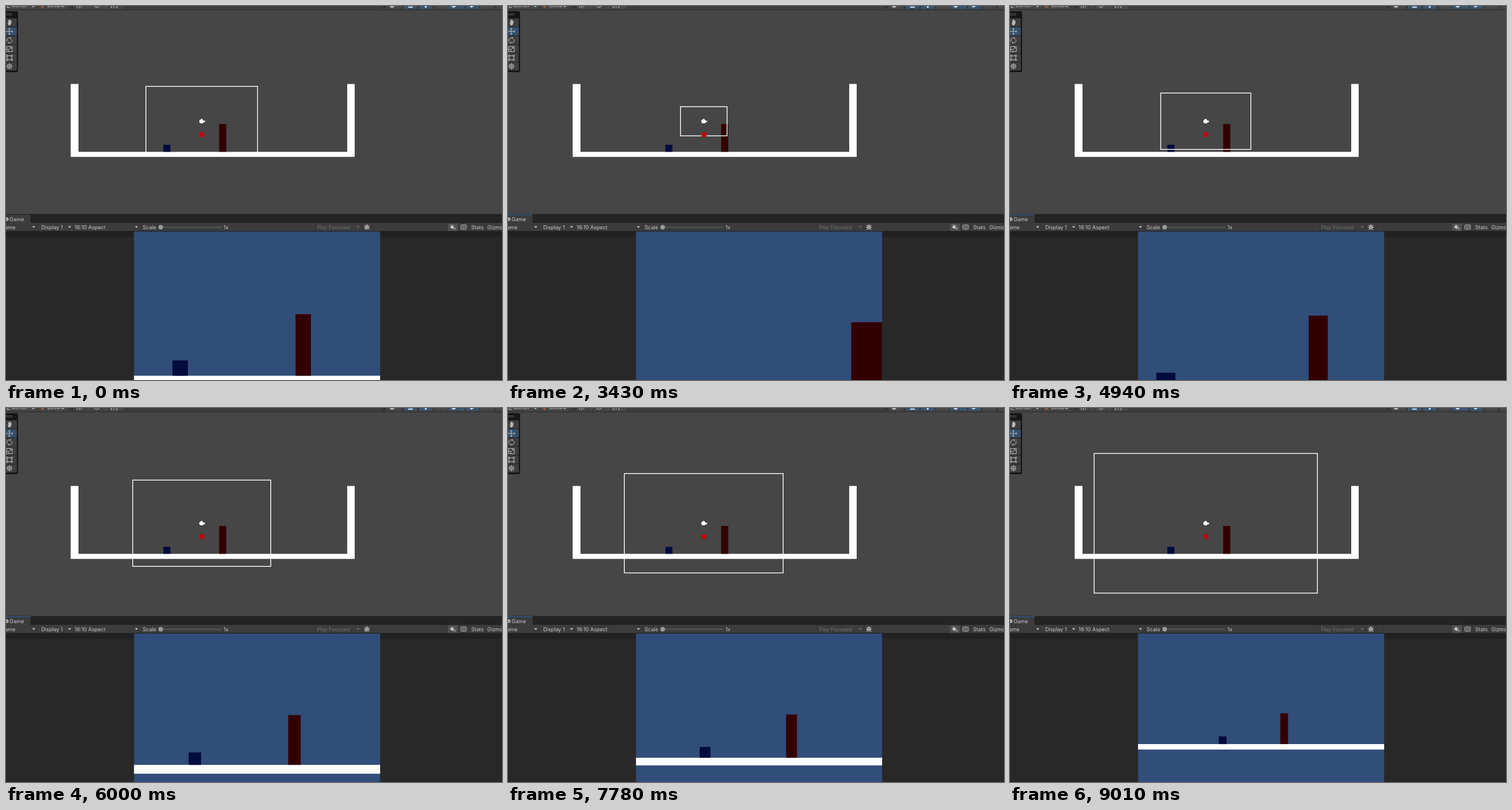
Recreate the animation shown at these times as an HTML page. Size 862 px wide and 650 px high, loop 9760 ms.

```html
<!DOCTYPE html>
<html lang="en">
<head>
<meta charset="utf-8">
<title>Camera zoom</title>
<style>
html, body { margin: 0; width: 100%; height: 100%; overflow: hidden; background: #282828; }
svg { display: block; width: 862px; height: 650px; }
text { font: 9px Inter, "Liberation Sans", sans-serif; fill: #c8c8c8; }
.icon { fill: none; stroke: #bdbdbd; stroke-width: 1; }
</style>
</head>
<body>
<svg viewBox="0 0 862 650">
  <defs>
    <clipPath id="screen"><rect x="222.5" y="392" width="427.7" height="258"/></clipPath>
  </defs>

  <!-- scene view -->
  <rect width="862" height="362" fill="#464646"/>
  <path d="M112.4 135.5H126V253.4H593V135.5H606V262.3H112.4Z" fill="#fff"/>
  <rect x="273.5" y="241.2" width="12.2" height="12.2" fill="#010c3f"/>
  <rect x="370.5" y="205" width="12.3" height="48.4" fill="#330000"/>
  <rect id="frame" fill="none" stroke="#fff" stroke-width="1.4"/>
  <path d="M335.8 200.3q-.4-2 1.8-2.4q.6-2 2.8-1.6q2 .3 2 2.2q1.2.2 1.6 1.2l1.8-.9v3.6l-2-.8q-.2 2-2 2.2q-2.600.5-4.600-.3q-1.300-.4-1-1.900Z" fill="#fff"/>
  <rect x="336.700" y="219.500" width="8" height="8" fill="#c00808"/>

  <!-- scene toolbar, cut by the top edge -->
  <rect width="862" height="7" fill="#3c3c3c"/>
  <rect y="6.500" width="862" height="1" fill="#303030"/>
  <g id="topButtons"></g>
  <text x="9" y="2">Center</text>
  <text x="72" y="2">Local</text>
  <path d="M45 0h5l-2.500 2ZM96 0h5l-2.500 2Z" fill="#c8c8c8"/>
  <circle cx="671" cy="-1" r="4" fill="#b5b5b5"/>
  <path class="icon" d="M2 0v2.500h5M124 0v3M128 0v4M131 0v2M154 0q4 5 8 0M183 0v3h2M188 0v3M193 0v3h-2"/>
  <path d="M60 0h6l-2 4Z" fill="#b05a32"/>
  <path d="M699 1h8v2h-8ZM728 0h3v3h-3ZM774 0q4 6 8 0ZM806 0h8l-6 3Z" fill="#d0d8e0"/>

  <!-- tool palette -->
  <path d="M0 9H18q3 0 3 3V112q0 3-3 3H0Z" fill="#161616"/>
  <path d="M0 13.500h11M0 15.800h11" stroke="#555" fill="none"/>
  <g id="tools"></g>
  <path d="M2 28.500l2 2v-5.500h1.200v3v-4.500h1.300v4.500v-4h1.300v4.500l.5-3h1.400l-.3 4.500l-2 3.500h-3Z" fill="#b8b8b8"/>
  <g class="icon">
    <path d="M0 44.200H11.500M5.800 39V49.500M4 40.500l1.800-2l1.800 2M4 48l1.800 2l1.800-2M10 42.400l2 1.800l-2 1.800"/>
    <path d="M2 62a4.500 4.500 0 0 1 6-6.200M10 57.500a4.500 4.500 0 0 1-6 6.200M7.500 54.300l1 1.700l-2 1M4.500 65.200l-1-1.700l2-1"/>
    <path d="M1 70.500h10v9H1ZM1 75.500h4v4M6 74.500l3-2.500M7 72h2v2"/>
    <path d="M2 86.500h8v7H2Z"/>
    <path d="M.5 85h2.500v2.500H.5ZM9 85h2.500v2.500H9ZM.5 92.500h2.500v2.500H.5ZM9 92.500h2.500v2.500H9Z" stroke-width=".7"/>
    <circle cx="6" cy="104.700" r="3.500"/>
    <path d="M.5 104.700h11M6 99.300v11M2 101l2 2M10 101l-2 2M2 109l2-2M10 109l-2-2"/>
  </g>

  <!-- game panel -->
  <rect y="361.500" width="862" height="16" fill="#242424"/>
  <rect y="363" width="42.500" height="15" fill="#3c3c3c"/>
  <rect id="focus" y="362" width="42.500" height="1.200" fill="#2f5f8f"/>
  <rect y="377" width="862" height="14.500" fill="#3c3c3c"/>
  <rect y="391" width="862" height="10.500" fill="#212121"/>
  <rect y="401.500" width="862" height="249" fill="#282828"/>
  <circle cx="1.500" cy="370.500" r="3" fill="#c8c8c8"/>
  <path d="M0 370.500l1.300 1.300l2.500-3" fill="none" stroke="#333"/>
  <text x="6.300" y="373.700">Game</text>
  <text x="-8.500" y="387.600">Game</text>
  <text x="61.300" y="387.600">Display 1</text>
  <text x="119.300" y="387.600">16:10 Aspect</text>
  <text x="237.500" y="387.600">Scale</text>
  <text x="378" y="387.600">1x</text>
  <text x="540.500" y="387.600" style="fill:#717171">Play Focused</text>
  <text x="808.500" y="387.600">Stats</text>
  <text x="836.500" y="387.600">Gizmos</text>
  <path d="M45.500 382.800h5.500l-2.750 3ZM107.800 382.800h5.500l-2.750 3ZM224 382.800h5.500l-2.750 3Z" fill="#c8c8c8"/>
  <path d="M609.300 382.800h5.500l-2.750 3Z" fill="#717171"/>
  <path d="M54.500 378v13M116.500 378v13M233.500 378v13M538.500 378v13M618.500 378v13M636.500 378v13M767.500 378v13M786 378v13M804.500 378v13M833.500 378v13" stroke="#323232" fill="none"/>
  <path d="M269 384.500H374" stroke="#5e5e5e" stroke-width="1.300"/>
  <circle cx="268.800" cy="384.500" r="4" fill="#999"/>
  <ellipse cx="627.300" cy="384.700" rx="2.800" ry="3.700" fill="#c8c8c8"/>
  <path class="icon" d="M622.500 381l2.500 1.500M632 381l-2.500 1.500M622 384.700h10.500M622.500 389l2.500-2M632 389l-2.500-2M625.500 379.500l1.800 1.500l1.800-1.500"/>
  <path d="M627.300 382v6" stroke="#3c3c3c"/>
  <rect x="768" y="378" width="17.500" height="13" fill="#505050"/>
  <path d="M772.500 382.500h2l2.500-2.500v8l-2.500-2h-2Z" fill="#d0d0d0"/>
  <path class="icon" d="M778.500 382v3.500M780.500 385.500v3M773 380l7 8"/>
  <rect class="icon" x="790.500" y="380.500" width="9.500" height="7.500" rx="1"/>
  <path d="M792 382.700h7M792 384.500h7M793.500 386.300h4" stroke="#bdbdbd" stroke-dasharray="1.200 .6"/>

  <g clip-path="url(#screen)">
    <rect x="222" y="392" width="429" height="258" fill="#314d79"/>
    <rect id="floor" fill="#fff"/>
    <rect id="crate" fill="#010c3f"/>
    <rect id="tower" fill="#330000"/>
  </g>
  <path id="cursor" d="M0 0V15l3.500-3.200l2.300 5.300l2.500-1l-2.300-5.200h4.800Z" fill="#000" stroke="#fff"/>
</svg>
<script>
const LOOP = 9760;
const UNIT = 12.13;                       // scene pixels per world unit
const EYE = { x: 340.2, y: 200.3 };       // camera in the scene view
const VIEW = { x: 436.4, y: 525.6, half: 213.8 };
const FLOOR = 4.375;                      // floor top below the camera

// half width of the camera frame over time
const zoomKeys = [
  [0, 97], [2390, 97], [2940, 38.8], [3415, 38.8], [4240, 126], [4490, 126],
  [4947, 77.7], [5490, 136], [5610, 149], [5720, 149], [6000, 120],
  [6505, 66.5], [6565, 66.5], [6890, 100.2], [7160, 128.2], [7690, 128.2],
  [7930, 154], [8060, 154], [8305, 128.5], [8365, 128.5], [8470, 139.5],
  [9010, 194], [LOOP, 194]
];
const cursorKeysX = [[880, 862], [1100, 831], [1940, 831], [2180, 836]];
const cursorKeysY = [[880, 650], [1100, 629], [1940, 629], [2180, 652]];

const $ = id => document.getElementById(id);

function track(keys, t) {
  if (t <= keys[0][0]) return keys[0][1];
  for (let i = 1; i < keys.length; i++) {
    const [t0, a] = keys[i - 1], [t1, b] = keys[i];
    if (t <= t1) return a + (b - a) * (t - t0) / (t1 - t0);
  }
  return keys[keys.length - 1][1];
}

function setRect(id, x, y, width, height) {
  const box = { x, y, width, height };
  for (const key in box) $(id).setAttribute(key, box[key].toFixed(2));
}

function button(x, y, w, h, fill) {
  return `<rect x="${x}" y="${y}" width="${w}" height="${h}" rx="1" fill="${fill}"/>`;
}

$("tools").innerHTML = [0, 1, 2, 3, 4, 5].map(i =>
  button(-2, 21.5 + i * 15.2, 20.8, 14.6, i === 1 ? "#36506b" : "#3e3e3e")).join("");
$("topButtons").innerHTML =
  [[-2, 56], [57, 48], [121, 16], [139, 8], [149, 18], [169, 8], [179, 26], [663, 24], [745, 22], [825, 23], [852, 14]]
    .map(([x, w]) => button(x, -6, w, 11, "#484848")).join("") +
  [[692, 22], [718, 23], [769, 15], [785, 12], [800, 22]]
    .map(([x, w]) => button(x, -6, w, 11, "#3a5470")).join("") +
  `<path d="M113.500 0v4M115.500 0v4M656 0v4M658 0v4" stroke="#252525"/>`;

function draw(t) {
  const half = track(zoomKeys, t), tall = half * 0.6255;
  setRect("frame", EYE.x - half, EYE.y - tall, half * 2, tall * 2);

  const scale = UNIT * VIEW.half / half;
  const project = (id, x, y, w, h) =>
    setRect(id, VIEW.x + x * scale, VIEW.y + y * scale, w * scale, h * scale);
  project("floor", -18, FLOOR, 38, 0.71);
  project("crate", -5.5, FLOOR - 1, 1, 1);
  project("tower", 2.5, FLOOR - 4, 1, 4);

  $("focus").style.display = t >= 1940 ? "" : "none";
  $("cursor").style.display = t >= 890 && t < 2180 ? "" : "none";
  $("cursor").setAttribute("transform", `translate(${track(cursorKeysX, t)} ${track(cursorKeysY, t)})`);
}

const start = performance.now();
function tick() {
  draw((performance.now() - start) % LOOP);
  requestAnimationFrame(tick);
}
tick();
</script>
</body>
</html>
```
